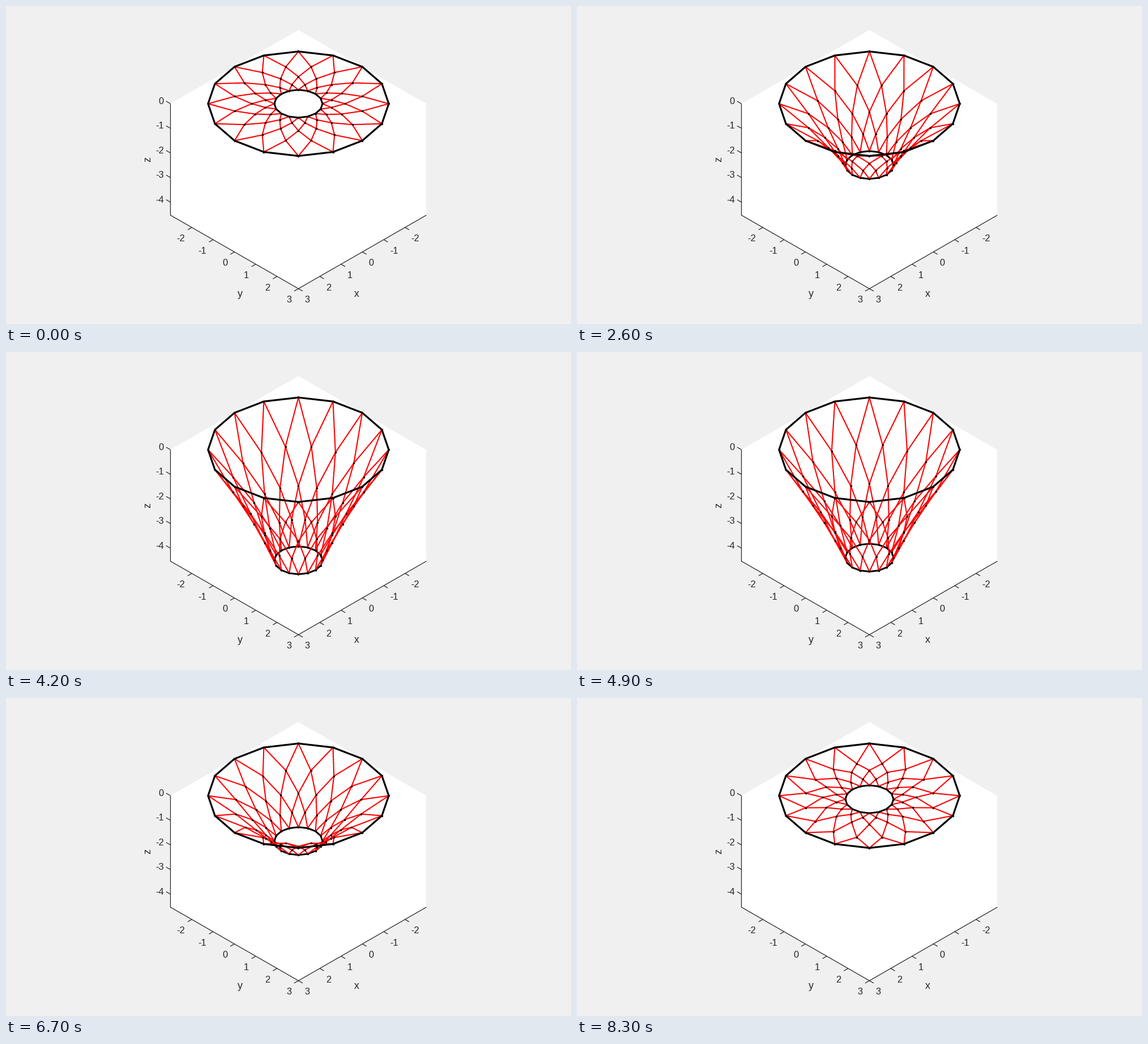
A matplotlib script for the animation above (8400 ms loop, 998x561 px).

```python
import numpy as np
import matplotlib.pyplot as plt
from matplotlib.animation import FuncAnimation
from matplotlib.collections import LineCollection

W, H, DPI = 998, 561, 64
FRAMES, INTERVAL = 84, 100
PT = 72 / DPI                      # points per pixel
INK = "#262626"
CX, CY, SCALE = 516.5, 172.4, 53.2
SIN_EL, COS_EL = np.sqrt(1 / 3), np.sqrt(2 / 3)

N = 16                             # nodes per ring
K = np.arange(5)                   # rings, outside to inside
REST = 3 * (0.8 / 3) ** (K / 4)
FREE = np.array([0, 1, 1, 1, 0])   # the first and last ring are rigid
SAG = np.array([0, 0.315, 0.577, 0.808, 1])
SLACK = FREE * (4 - K)
DEPTH, BOUNCE = 4.54, 89           # lowest point, frames of a whole bounce


def fall(n):
    """Bounce from 0 to 1 and back: free fall caught by a stiffening spring."""
    a = np.pi * n / BOUNCE
    s = 0.955 * np.sin(a) - 0.043 * np.sin(3 * a) + 0.002 * np.sin(5 * a)
    return s * s


def rings(n):
    """Radius and height of each ring."""
    drop = DEPTH * fall(n)
    pinch = 0.044 * (1 - np.cos(np.pi * min(n, 76) / 76) ** 6)
    stretch = 0.1 * fall(n - 2) ** 10
    r = REST * (1 + FREE * (stretch - pinch))
    # The net hangs back while the drop is small, and flaps at the end.
    lag = 0.112 * drop * np.exp(-drop ** 2 / 3) * (1 - n / 190)
    flap = 0.174 * (max(0, n - 72) / 11) ** 2
    return r, SLACK * lag - SAG * drop - flap * (K == 1)


def project(r, a, z):
    x = CX + SCALE * r * np.sin(a)
    y = CY - SCALE * (SIN_EL * r * np.cos(a) + COS_EL * z)
    return np.stack(np.broadcast_arrays(x, y), axis=-1)


fig = plt.figure(figsize=(W / DPI, H / DPI), dpi=DPI, facecolor="#f0f0f0")
ax = fig.add_axes([0, 0, 1, 1])
ax.set_xlim(0, W)
ax.set_ylim(H, 0)
ax.axis("off")


def label(x, y, text, ha, px=16.5, **kw):
    ax.text(x, y, text, ha=ha, va="baseline", color=INK,
            family="Liberation Sans", fontsize=px * PT, **kw)


def stroke(xs, ys):
    ax.plot(xs, ys, color=INK, lw=1.25 * PT, solid_capstyle="butt", zorder=1)


def draw_axes():
    left, right, top, low, front = 290.4, 742, 172.3, 369, 498.7
    ax.fill([CX, right, right, CX, left, left],
            [42.3, top, low, front, low, top], color="white", lw=0, zorder=0)
    stroke([left, left], [top, low])
    stroke([left, CX, right + 0.5], [low, front, low])
    dx, dy = 7.5, 4.3
    for v in range(-2, 4):
        off, y = (3 - v) * 37.6, front - (3 - v) * 21.65
        stroke([CX - off, CX - off - dx], [y, y + dy])
        stroke([CX + off, CX + off + dx], [y, y + dy])
        label(CX - off - 12.2, y + 24.6, str(v), "right")
        label(CX + off + 11, y + 24.6, str(v), "left")
    for v in range(0, -5, -1):
        y = top - v * SCALE * COS_EL
        stroke([left, left - dx], [y, y - dy])
        label(278.7, y + 0.6, str(v), "right")
    label(619.5, 513.3, "x", "center", 18)
    label(413, 513.3, "y", "center", 18)
    label(255, 270.5, "z", "center", 18, rotation=90, rotation_mode="anchor")


draw_axes()

inner, = ax.plot([], [], color="black", lw=3 * PT, zorder=2)
net = LineCollection([], colors="red", linewidths=2.1 * PT, zorder=3)
ax.add_collection(net, autolim=False)
outer, = ax.plot([], [], color="black", lw=3.2 * PT, zorder=4)
dots, = ax.plot([], [], "o", color="black", ms=3.6 * PT, mew=0, zorder=5)

STEP = 2 * np.pi / N
LOOP = np.arange(N + 1) * STEP


def update(n):
    r, z = rings(n)
    # Every strand turns by half a step from ring to ring, either way round.
    strands = [project(r, a + side * K * STEP / 2, z)
               for a in LOOP[:N] for side in (1, -1)]
    net.set_segments(strands)
    outer.set_data(*project(r[0], LOOP, z[0]).T)
    inner.set_data(*project(r[-1], LOOP, z[-1]).T)
    dots.set_data(*np.concatenate(strands[::2]).T)
    return inner, net, outer, dots


anim = FuncAnimation(fig, update, frames=FRAMES, interval=INTERVAL,
                     init_func=lambda: update(0), repeat=True, repeat_delay=0)
plt.show()
```
